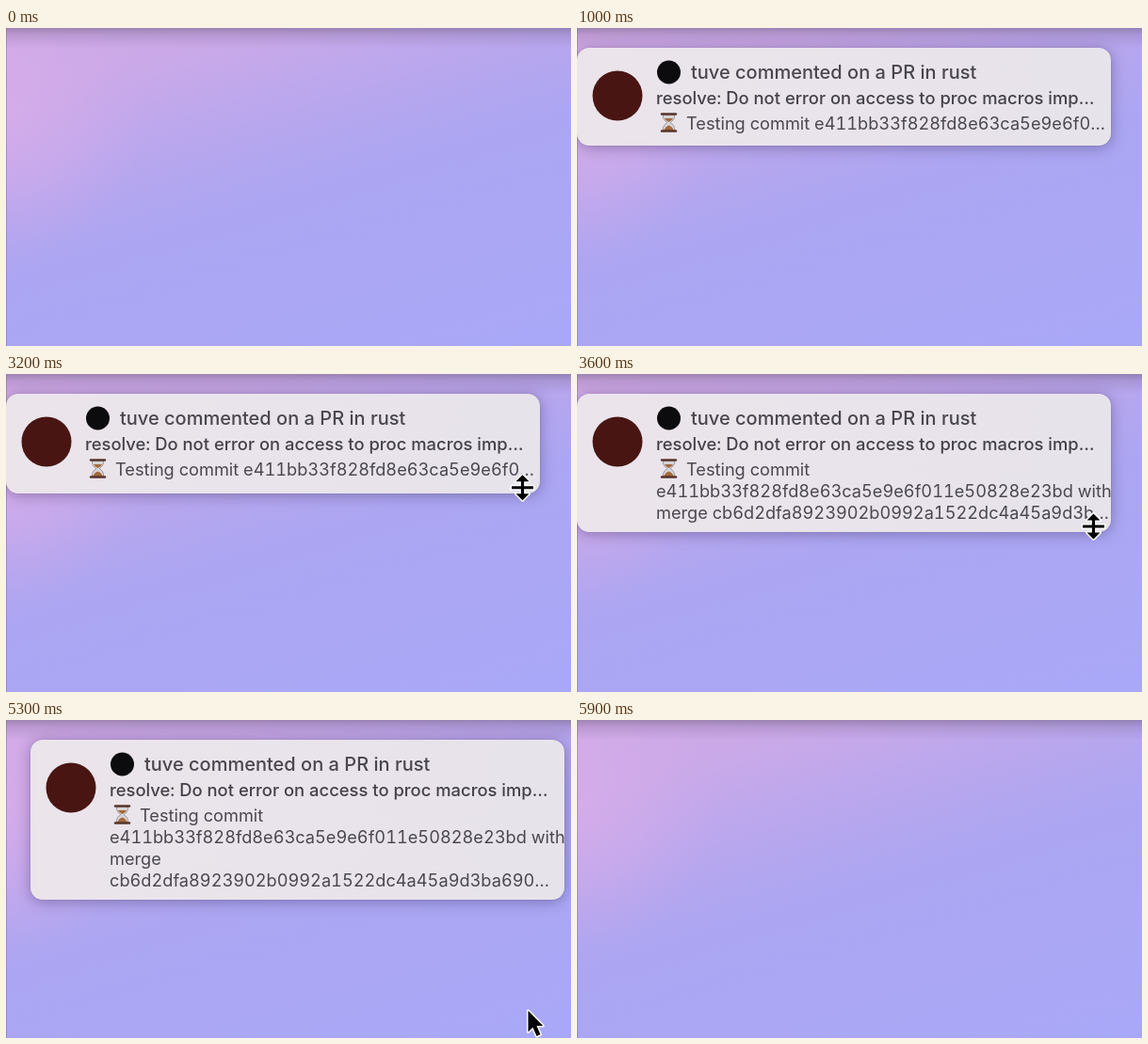
Animation, 600 px wide and 338 px high, one loop 6 s. Source, as an HTML page with a canvas:

```html
<!DOCTYPE html>
<html lang="en">
<head>
<meta charset="utf-8">
<title>Notification</title>
<style>
html, body { margin: 0; width: 100%; height: 100%; overflow: hidden; }
#stage { position: relative; width: 600px; height: 338px; overflow: hidden; background: #aaa8f6; }
#stage > *, #card > * { position: absolute; left: 0; top: 0; }
#stage > #card, #stage > #shade { top: 21px; width: 567px; border-radius: 13px; }
#card { overflow: hidden; background: linear-gradient(100deg, #ebe4eb, #e7e3eb); }
#shade { box-shadow: 0 2px 15px rgba(40, 25, 70, .36), 0 0 1px rgba(50, 40, 70, .5); }
#card > .text {
  left: 84px; white-space: pre; color: #4a474f;
  font: 18.2px/24px Inter, Roboto, sans-serif; font-variant-numeric: tabular-nums;
}
#card > #title { left: 121px; top: 14px; font-size: 20px; font-weight: 500; color: #49464d; }
#card > #sub { top: 40.7px; font-size: 18.4px; font-weight: 500; color: #444148; }
#arrow, #sizer { overflow: visible; fill: #000; stroke: #fff; stroke-width: 3; paint-order: stroke; stroke-linejoin: round; }
</style>
</head>
<body>
<div id="stage">
  <canvas id="bg" width="600" height="338"></canvas>
  <div id="shade"></div>
  <div id="card">
    <svg width="120" height="104">
      <circle cx="43" cy="51" r="26.5" fill="#481512"/>
      <circle cx="97.5" cy="26" r="12.5" fill="#0c0b0d"/>
      <path d="M91.5 71V74Q92 77 96 79.500Q92 82 91.500 85V88H103.500V85Q103 82 99 79.500Q103 77 103.500 74V71Z" fill="#d5d5d8" stroke="#8d8a8c" stroke-width=".8"/>
      <path d="M93 75H102Q101 77 97.500 79Q94 77 93 75ZM92.500 88Q93 84 97.500 82.500Q102 84 102.500 88Z" fill="#a66736"/>
      <path d="M90 70.500H105M90 88.500H105" stroke="#56352a" stroke-width="2.600" stroke-linecap="round"/>
    </svg>
    <div id="title" class="text">tuve commented on a PR in rust</div>
    <div id="sub" class="text">resolve: Do not error on access to proc macros imp…</div>
  </div>
  <svg id="arrow" width="20" height="32">
    <path d="M1 2V24.500L6 19.700L10 29L14 27.300L10 18H16.800Z"/>
  </svg>
  <svg id="sizer" width="1" height="1">
    <path d="M0 -13.500L7 -6.500H1.600V-1.500H11.500V1.500H1.600V6.500H7L0 13.500L-7 6.500H-1.600V1.500H-11.500V-1.500H-1.600V-6.500H-7Z"/>
  </svg>
</div>
<script>
const LOOP = 6000, STEP = 100;
const TOP = 21, CLOSED = 125, OPEN = 191, LINE_TOP = 67.6, LINE_GAP = 23;
const $ = id => document.getElementById(id);

const hash = "e411bb33f828fd8e63ca5e9e6f011e50828e23bd";
const merge = "cb6d2dfa8923902b0992a1522dc4a45a9d3ba690";
const wraps = [
  ["Testing commit " + hash.slice(0, 27) + "…"],
  ["Testing commit", hash + " wi…"],
  ["Testing commit", hash + " with", "merge " + merge.slice(0, 36) + "…"],
  ["Testing commit", hash + " with", "merge", merge + "…"]
];

const part = (t, from, to) => Math.min(1, Math.max(0, (t - from) / (to - from)));
const smooth = (t, from, to) => {
  const p = part(t, from, to);
  return p * p * (3 - 2 * p);
};
const slideX = t => 600 * (1 - part(t, 200, 1000)) ** 2 + 650 * part(t, 5200, 5700) ** 2;
const dragY = t => (OPEN - CLOSED) * part(t, 3100, 3720) ** 2;

function pointer(t) {
  const enter = smooth(t, 1300, 2300), grab = smooth(t, 2400, 2700);
  const away = smooth(t, 3700, 4300), leave = smooth(t, 5500, 5700);
  return [
    536 + 11.5 * enter + grab + 5 * away,
    345 - 241 * enter + 15 * grab + dragY(t) + 122 * away + 40 * leave
  ];
}

function fill(g, gradient, stops, h = 338) {
  stops.forEach(([p, c]) => gradient.addColorStop(p, c));
  g.fillStyle = gradient;
  g.fillRect(0, 0, 600, h);
}

function paintBackdrop() {
  const g = $("bg").getContext("2d");
  fill(g, g.createLinearGradient(0, 0, 143, 477), [
    [0, "#cfaae6"], [.15, "#cba9e8"], [.27, "#c0a8ec"], [.4, "#b4a6ef"], [.52, "#aca6f2"], [1, "#a9a8f8"]
  ]);
  fill(g, g.createRadialGradient(0, 95, 0, 0, 95, 150), [
    [0, "rgba(220,174,234,.6)"], [.5, "rgba(217,173,234,.35)"], [1, "rgba(210,170,235,0)"]
  ]);
  fill(g, g.createLinearGradient(0, 0, 0, 22), [
    [0, "rgba(100,85,115,.45)"], [.35, "rgba(110,90,130,.22)"], [1, "rgba(130,100,150,0)"]
  ], 22);
  g.fillStyle = "rgba(110,100,150,.4)";
  g.fillRect(0, 0, 1, 338);
}

const lines = wraps[3].map((_, i) => {
  const el = document.createElement("div");
  el.className = "text";
  el.style.top = LINE_TOP + i * LINE_GAP + "px";
  if (i === 0) el.style.left = "116px";
  $("card").append(el);
  return el;
});

function place(el, x, y) {
  el.style.transform = `translate(${x}px, ${y}px)`;
}

function show(el, on) {
  el.style.visibility = on ? "visible" : "hidden";
}

function render(now) {
  const t = Math.floor(now % LOOP / STEP) * STEP;
  const x = slideX(t), bottom = CLOSED + dragY(t);
  for (const el of [$("card"), $("shade")]) {
    show(el, t >= 300 && t < 5700);
    el.style.height = bottom - TOP + "px";
    place(el, x, 0);
  }
  const count = Math.max(1, Math.min(4, Math.floor((bottom - 96) / LINE_GAP)));
  lines.forEach((el, i) => el.textContent = wraps[count - 1][i] || "");

  const sizing = t >= 2600 && t <= 3800;
  show($("arrow"), !sizing);
  show($("sizer"), sizing);
  place(sizing ? $("sizer") : $("arrow"), ...pointer(t));
}

function tick() {
  render(performance.now());
  requestAnimationFrame(tick);
}

paintBackdrop();
tick();
</script>
</body>
</html>
```
